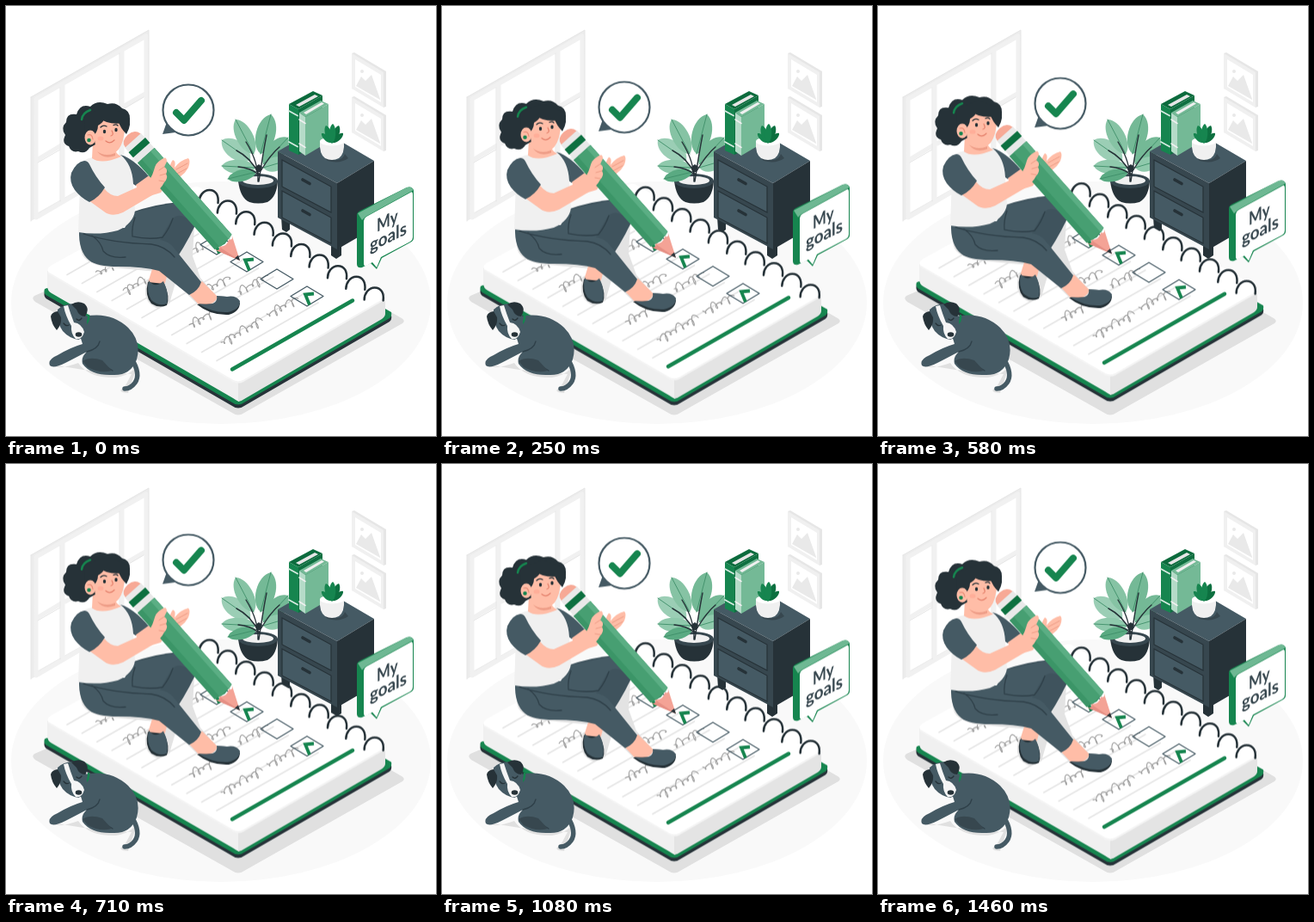
These frames come from a looping animation (500x500 px, 1500 ms). An HTML page:

```html
<!DOCTYPE html>
<html lang="en">
<head>
<meta charset="utf-8">
<title>My goals</title>
<style>
  html, body { margin: 0; width: 100%; height: 100%; overflow: hidden; background: #fff; }
  svg { display: block; width: 100vw; height: 100vh; }
  .float { animation: float 1.5s linear infinite; }
  @keyframes float { 50% { transform: translateY(-10px); } }
  .navy { fill: #455a64; }
  .dark { fill: #263238; }
  .green { fill: #16854f; }
  .skin { fill: #ffbda7; }
  .pale { fill: #f0f0f0; }
  .shade { fill: #e0e0e0; }
  .line { fill: none; stroke-linecap: round; stroke-linejoin: round; }
  .ink { stroke: #263238; }
  .slate { stroke: #455a64; }
  .sign { font: 700 20px Lato, "Open Sans", sans-serif; fill: #37474f; }
</style>
</head>
<body>
<svg viewBox="0 0 500 500">
  <ellipse cx="250" cy="345" rx="244" ry="141" fill="#f9f9f9"/>

  <g id="window">
    <path fill="#ececec" d="M29 106L166 28V172L29 250ZM34 109V242L163 169V36Z" fill-rule="evenodd"/>
    <path class="line" stroke="#f1f1f1" stroke-width="5" stroke-linecap="butt" d="M35 246V108L163 35V171ZM66 91V228M135 52V189M36 179L66 161M69 160L133 123M136 117L162 102"/>
    <path class="line" stroke="#e6e6e6" d="M29 106V250M29 106L166 28V172M63 95V227M132 55V190M37 182L63 167M138 119L160 106"/>
  </g>

  <g id="frame">
    <path fill="#e6e6e6" d="M402 55L405 54L442 76V117L439 118Z"/>
    <path class="pale" d="M402 55L439 77V118L402 96Z"/>
    <path fill="#fff" d="M406 62L436 80V112L406 94Z"/>
    <path fill="#e9e9e9" d="M407 93L413 82L418 87L425 80L435 108V109Z"/>
    <circle cx="414" cy="76" r="2" fill="#e9e9e9"/>
  </g>
  <use href="#frame" y="51"/>

  <path class="shade" d="M33 337Q29 340 34 344L263 473Q270 478 277 473L461 369Q465 366 460 363L250 243Z"/>

  <g id="plant">
    <path class="dark" d="M270 203Q272 223 283 228Q293 231 304 228Q315 222 316 203Z"/>
    <ellipse cx="293" cy="203.500" rx="23" ry="8.500" fill="#37474f"/>
    <ellipse cx="293" cy="203" rx="18" ry="5" fill="#f0f0f0"/>
    <g id="leaves"></g>
    <path class="line ink" stroke-width="1.400" d="M293 204Q294 182 279 158M294 204Q299 170 303 150M294 195Q284 176 268 168M294 196Q284 188 270 187M296 192Q308 172 318 164"/>
    <path class="dark" d="M290 187L294 184L298 187L296 193H291Z"/>
  </g>

  <g id="cabinet">
    <path class="dark" d="M320 245H330V260L326 263L321 260ZM378 278L385 274L390 279V290L384 294L378 290ZM421 258L427 255V265L423 268Z"/>
    <path class="navy" d="M316 169L363 142L428 180L385 206Z"/>
    <path fill="#37474f" d="M316 169L385 206V283L316 246Z"/>
    <path class="dark" d="M385 206L428 180V258L385 283Z"/>
    <g id="drawer">
      <path class="navy" stroke="#263238" stroke-width="1.200" d="M321 179L378 210V240L321 210Z"/>
      <path class="line ink" stroke-width="3.600" d="M345 202L353 206.500"/>
    </g>
    <use href="#drawer" y="36"/>
  </g>

  <g id="books">
    <path fill="#0c6b3d" d="M329 114L357 99L368 104L340 120Z"/>
    <path fill="#e6e6e6" d="M337 115L359 103L363 105L341 117Z"/>
    <path class="green" d="M329 114L340 120V173L329 168Z"/>
    <path fill="#0f7041" d="M340 120L368 104V158L340 173Z"/>
    <path class="line" stroke="#d5eae0" stroke-width="1.800" d="M329 122L339 127.500M329 158L339 163.500"/>
    <path fill="#74b996" d="M341 124L366 110L375 114L348 129Z"/>
    <path class="pale" d="M346 124L367 112L370 113.500L349 126Z"/>
    <path fill="#b5dbc8" d="M341 124L348 129V174L341 169Z"/>
    <path fill="#74b996" d="M348 129L375 114V158L348 174Z"/>
    <path class="line" stroke="#f0f0f0" stroke-width="1.500" d="M341 132L348 136.500M341 160L348 164.500"/>
  </g>

  <path fill="#37474f" d="M370 176Q390 184 394 172L398 177Q388 184 374 180Z"/>
  <path class="pale" d="M365 157Q364 172 371 177Q379 181 387 177Q394 172 393 157Z"/>
  <ellipse cx="379" cy="157.500" rx="14" ry="5" fill="#fff"/>
  <g id="spikes"></g>

  <g class="float">
    <g id="notebook">
      <path id="cover" class="dark" d="M45 332Q43 338 48 341L263 465Q270 470 277 465L446 367Q449 365 448 360L260 250Z"/>
      <use href="#cover" y="-4" class="green" style="display:none"/>
      <path class="green" d="M45 329Q43 334 48 337L263 461Q270 466 277 461L446 363Q449 361 448 356L260 250Z"/>
      <path class="pale" d="M48 308V326Q48 331 53 334L264 456Q270 460 271 460L278 435L100 320Z"/>
      <path fill="#e4e4e4" d="M270 436L441 334V358Q441 361 437 364L277 457Q273 460 270 460Z"/>
      <path fill="#fff" d="M52 302Q45 307 52 312L263 435Q270 439 277 435L438 342Q444 338 438 333L227 212Q222 208 215 212Z"/>
      <path class="line" stroke="#f4f4f4" stroke-width="2" d="M50 311L264 436Q270 439 276 436L440 341"/>
      <g id="rules" class="line" stroke="#e6e6e6" stroke-width="1.700"></g>
      <g id="words" class="line" stroke="#a0a0a0" stroke-width="1.100"></g>
      <path class="line" stroke="#16854f" stroke-width="4.500" d="M263 422.500L403 342.500"/>
      <path fill="#e3e3e3" d="M88 277Q83 296 112 303L176 309L164 320Q156 344 177 352L190 346L197 322L226 350Q242 361 262 357L226 316L217 291L219 256Z"/>
      <g id="boxes" class="line"></g>
      <g id="rings" class="line ink" stroke-width="2.500"></g>
    </g>

    <g id="woman">
      <path class="skin" d="M173 296L165 322Q175 333 185 322L191 299Z"/>
      <path class="dark" d="M165 321Q161 337 169 346Q178 352 187 348Q191 338 184 323Z"/>
      <path class="navy" d="M166 319Q163 333 169 342Q178 350 187 346Q190 334 183 320Q173 329 166 319Z"/>
      <path class="skin" d="M212 334L228 320L246 338Q242 350 224 347Z"/>
      <path class="dark" d="M222 347Q238 360 259 359Q272 355 272 345L250 346Z"/>
      <path class="navy" d="M223 346Q240 357 258 356Q272 353 272 343Q267 336 257 338Q249 337 245 337Q247 347 233 347Z"/>

      <path fill="#3f535d" d="M146 240Q174 230 203 228Q221 238 219 257Q207 282 191 304Q178 303 168 299L150 270Z"/>
      <path class="navy" d="M85 260Q84 286 97 296Q106 303 130 303Q160 303 178 308L213 336Q224 331 227 321L195 281Q190 274 179 272L192 249Q204 236 219 256L214 238Q207 229 198 229L148 240L138 258Z"/>
      <path class="line" stroke="#2f4049" stroke-width="1.300" d="M150 246Q146 257 147 268Q166 272 182 269Q190 259 194 247M100 267Q111 275 113 285Q121 294 139 292M90 265Q124 276 169 277Q185 279 196 292"/>

      <path class="navy" d="M133 173Q148 177 166 198L151 209L139 201Z"/>
      <path class="skin" d="M151 208L165 198L178 197L188 204L180 217L157 224Z"/>
      <path class="pale" d="M101 176Q90 178 84 184L86 208L84 263Q108 267 130 261Q148 253 150 238L148 207Q147 184 133 173Q116 184 101 176Z"/>
      <path class="skin" d="M101 158L100 177Q111 185 134 175Q127 172 127 165Z"/>
      <path fill="#ee9d87" d="M106 169Q115 176 127 171V174Q113 179 106 169Z"/>

      <path class="skin" d="M182 204L189 193Q191 182 194 179Q198 180 196 188Q203 179 212 177Q215 180 212 188Q205 201 189 203Z"/>
      <path class="line" stroke="#ee9d87" d="M198 190L211 183M199 195L210 189"/>

      <g transform="translate(272 296) rotate(48.300)">
        <path fill="#f7a996" d="M-187 -12Q-196 -10 -196 0Q-196 11 -187 12H-180V-12Z"/>
        <path fill="#e9e9e9" d="M-187 -12.500L-160 -13V13L-187 12.500Z"/>
        <path fill="#0d7040" d="M-180 -13H-172V13H-180Z"/>
        <path fill="#3b9567" d="M-164 -13H-29L-26 0L-29 13.500H-164Z"/>
        <path fill="#479f72" d="M-164 -13H-29L-27 7H-164Z"/>
        <path fill="#5bae84" d="M-164 -13H-29L-27 -7H-164Z"/>
        <path fill="#f4a396" d="M-29 -13Q-22 -10 -27 -7Q-22 0 -28 7Q-23 10 -29 13.500L0 0Z"/>
        <path fill="#e58f84" d="M-27 7Q-23 10 -29 13.500L0 0Z"/>
        <path class="dark" d="M-6 -2.800L0 0L-6 2.800Z"/>
      </g>

      <g id="head">
        <path class="dark" d="M82 126Q70 124 70 135Q63 142 69 150Q64 160 73 163Q76 171 84 169Q92 173 97 165L111 157L136 145Q145 140 144 131Q144 121 135 119Q128 111 118 114Q106 109 98 117Q86 113 82 126Z"/>
        <path class="skin" d="M104 141Q102 154 104 162Q113 174 123 172Q132 170 136 156L138 146L137 136Q119 139 108 130Z"/>
        <path class="dark" d="M99 152Q107 148 107 139Q114 135 115 129Q122 136 130 133Q133 142 140 149Q147 137 142 127L117 117L92 127L91 148Z"/>
        <ellipse class="skin" cx="98" cy="153" rx="6.500" ry="8.500"/>
        <path class="line" stroke="#e88f79" stroke-width="1.200" d="M95 150Q100 148 101 155"/>
        <circle class="green" cx="96.500" cy="156" r="2.300"/>
        <path class="line" stroke="#16854f" stroke-width="2.500" d="M88 132Q89 124 98 121"/>
        <ellipse class="dark" cx="114.500" cy="146" rx="1.700" ry="2.200"/>
        <ellipse class="dark" cx="128" cy="144" rx="1.700" ry="2.200"/>
        <path class="line ink" stroke-width="1.300" d="M110 141Q113 138 117 140M125 138.500Q128 137 130 139"/>
        <path class="line" stroke="#e47f6a" stroke-width="1.200" d="M123 145Q126 150 122 151M116 157Q121 161 126 156"/>
        <ellipse cx="110" cy="154" rx="3.500" ry="2.500" fill="#ff9f8c" opacity=".5"/>
      </g>

      <path class="skin" d="M96 226L114 212Q121 221 130 221L163 206Q169 201 172 191Q174 182 180 179Q187 173 187 181L184 187Q189 190 186 195Q189 200 184 205Q181 212 170 220L136 240Q123 246 114 239Z"/>
      <path class="line" stroke="#ee9d87" d="M178 191L184 187M179 197L186 195M178 203L184 204"/>
      <path class="navy" d="M91 180Q82 181 76 194Q73 204 80 214Q87 223 97 228Q108 223 115 211Q104 199 97 184Q95 180 91 180Z"/>
    </g>

    <g id="tick">
      <path class="navy" d="M187 135L182 149L197 147Z"/>
      <circle cx="212" cy="121" r="29.500" fill="#fff" stroke="#455a64" stroke-width="2.200"/>
      <path class="line" stroke="#16854f" stroke-width="8" d="M198 124L207 133L227 110"/>
    </g>

    <g id="sign">
      <path class="green" d="M408 243Q408 240 412 238L466 211Q472 209 474 214V270Q474 273 470 275L437 293L431 306L424 299L414 304Q408 305 408 300Z"/>
      <path fill="#6eb893" d="M409 241L466 211Q471 209 474 214L418 245L414 249Z"/>
      <path fill="#fff" d="M416 250Q416 247 419 245L470 217Q473 215 473 219V269Q473 272 470 274L436 292L431 304L426 298L419 302Q416 303 416 299Z"/>
      <text class="sign" transform="translate(431 263) skewY(-26) scale(.84 1.050)">My</text>
      <text class="sign" transform="translate(423 286) skewY(-26) scale(.94 1.050)">goals</text>
    </g>
  </g>

  <g id="dog">
    <path class="shade" d="M53 417Q60 424 84 415Q96 433 128 432Q152 428 156 408L142 450Q127 449 138 443L146 428L90 423Z"/>
    <path class="line slate" stroke-width="5.500" d="M146 410Q157 428 150 438Q145 445 138 445"/>
    <path class="navy" d="M92 361Q121 355 142 374Q158 390 152 411Q145 430 124 429Q99 430 89 416Q87 408 94 402Q77 411 69 415Q55 422 51 418Q48 411 60 406Q75 397 89 393L84 377Z"/>
    <path class="line" stroke="#2f4049" stroke-width="1.300" d="M94 402Q107 399 109 390M98 417Q114 416 124 424"/>
    <path fill="#37474f" d="M89 413Q98 407 112 412L123 424Q109 428 95 420Z"/>
    <path class="line" stroke="#16854f" stroke-width="2.500" d="M91 371Q97 367 96 360"/>
    <path class="navy" d="M60 353Q69 344 85 347Q95 354 94 371Q92 386 84 388Q73 386 66 378Q59 369 60 353Z"/>
    <path fill="#f5f5f5" d="M67 349L72 348Q75 358 79 368Q88 369 91 379Q88 389 81 387Q75 381 76 372Q69 360 67 349Z"/>
    <path class="dark" d="M60 355Q53 356 52 361Q53 370 59 377Q65 370 64 362ZM76 347Q83 342 91 346Q98 352 92 361Q85 361 82 353Z"/>
    <ellipse class="dark" cx="84.500" cy="382" rx="3.800" ry="2.800"/>
    <path class="line ink" stroke-width="1.300" d="M67 369Q70 373 73 371M82 364Q85 367 88 363"/>
  </g>
</svg>
<script>
  const fill = (id, html) => { document.getElementById(id).innerHTML = html; };
  const repeat = (n, draw) => Array.from({ length: n }, (_, i) => draw(i)).join('');

  // Leaf from base (x, y) to tip (u, v), with half width w
  function leaf([x, y, u, v, w, color], vein) {
    const dx = u - x, dy = v - y, len = Math.hypot(dx, dy);
    const at = (k, s) => `${x + dx * k - dy / len * s} ${y + dy * k + dx / len * s}`;
    return `<path fill="${color}" d="M${x} ${y}C${at(.15, w)} ${at(.85, w)} ${u} ${v}C${at(.85, -w)} ${at(.15, -w)} ${x} ${y}Z"/>`
      + (vein ? `<path class="line" stroke="#3f8f69" stroke-width=".9" d="M${x} ${y}L${u} ${v}"/>` : '');
  }

  fill('leaves', [
    [299, 184, 328, 153, 14, '#74b996'],
    [284, 179, 251, 156, 14, '#9bceb5'],
    [288, 172, 267, 132, 13, '#86c3a4'],
    [296, 172, 308, 126, 15, '#74b996'],
    [290, 188, 251, 186, 11, '#8fc9ac'],
    [291, 193, 258, 201, 9, '#5aaa82'],
    [299, 188, 326, 180, 11, '#8fc9ac']
  ].map(a => leaf(a, true)).join(''));

  fill('spikes', [
    [378, 159, 367, 148, 4], [380, 159, 392, 148, 4],
    [378, 159, 372, 139, 5], [380, 159, 387, 139, 5], [379, 160, 380, 137, 5]
  ].map((a, i) => leaf([...a, i % 2 ? '#0d7040' : '#16854f'])).join(''));

  fill('rules', repeat(11, i => {
    const x = 245 - 17.400 * i, y = 412.500 - 10 * i;
    return `<path d="M${x} ${y}l118 -67.500"/>`;
  }));

  // Looped handwriting laid on the page plane
  function word([x, y, len]) {
    let d = '';
    for (let t = 0; t <= len; t += .5) {
      const p = t * .85 + .8 * Math.sin(t * .23 + len);
      const tall = 1.500 + 4.500 * Math.sin(t * .17 + len) ** 4;
      const a = t + 2.200 * Math.sin(p), b = tall * Math.cos(p);
      d += `${t ? 'L' : 'M'}${(x + a * .87 - b * .4).toFixed(1)} ${(y - a * .5 - b).toFixed(1)}`;
    }
    return `<path d="${d}"/>`;
  }
  fill('words', [
    [250, 393, 53], [303, 361, 40], [214, 372, 41], [270, 334, 38],
    [230, 333, 35], [138, 332, 29], [205, 292, 26], [107, 312, 24]
  ].map(word).join(''));

  fill('boxes', repeat(4, i => {
    const x = 245 + 35 * i, y = 277.500 + 20 * i;
    return `<path class="slate" stroke-width="1.300" d="M${x - 19} ${y}l19 -11.500l19 11.500l-19 11.500z"/>`
      + (i === 2 ? '' : `<path stroke="#16854f" stroke-width="3.800" stroke-linecap="butt" stroke-linejoin="miter" d="M${x + 8} ${y - 3}l-10 1l5 12"/>`);
  }));

  fill('rings', repeat(10, i =>
    `<path d="M${224.500 + 21.350 * i} ${228 + 12.600 * i}c0 -7 5 -14 12 -14c8 0 11 7 10 15"/>`));
</script>
</body>
</html>
```
